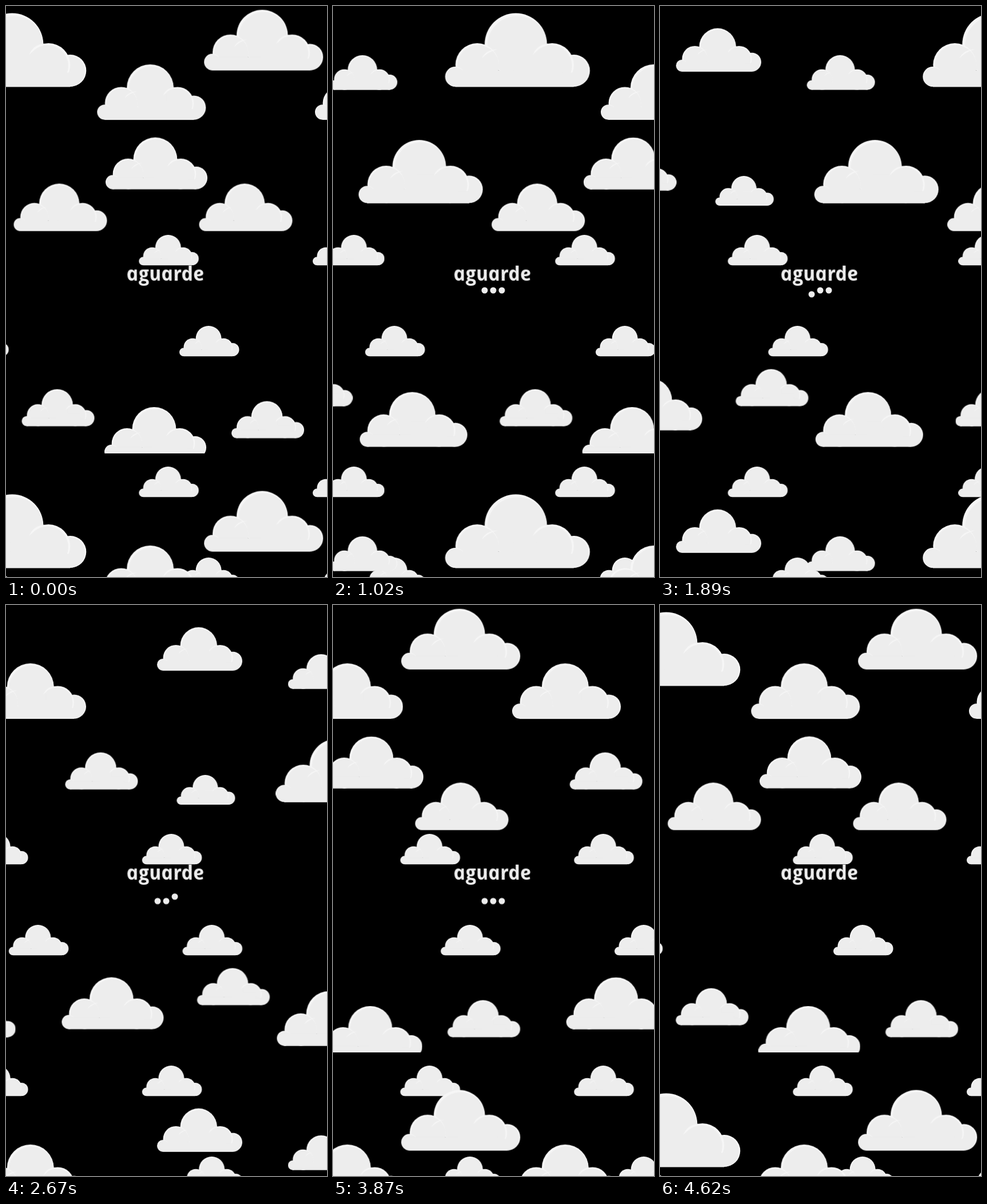
An HTML page that plays this animation: 561x998 px, repeating every 4.65 s.

```html
<!DOCTYPE html>
<html lang="pt">
<head>
<meta charset="utf-8">
<title>aguarde</title>
<style>
  html, body { margin: 0; width: 100%; height: 100%; overflow: hidden; background: #000; }
  svg { display: block; width: 561px; height: 998px; }
  .soft { fill: #ededed; }
  .light { fill: #f6f6f6; }
  .layer { animation: drift 4650ms steps(155) infinite; }
  .dot { animation: dot 4650ms linear infinite backwards; }
  /* an italic set upright again keeps its single-storey letters */
  text { font: italic 700 35px "Open Sans", "Noto Sans", sans-serif; text-anchor: middle; }
  @keyframes drift {
    from { transform: translateX(0); }
    to { transform: translateX(var(--travel)); }
  }
  @keyframes dot {
    0% { opacity: 0; transform: translateY(0); }
    6.45% { opacity: 1; }
    33.94% { transform: translateY(0); animation-timing-function: ease-in-out; }
    50.7% { transform: translateY(20.5px); }
    83.55% { opacity: 1; }
    85.3%, 100% { opacity: 0; transform: translateY(20.5px); }
  }
</style>
</head>
<body>
<svg viewBox="0 0 561 998">
  <defs>
    <g id="cloud"></g>
    <clipPath id="band"><path d="M-3000 600H3000V781.5H-3000Z"/></clipPath>
  </defs>
  <g id="sky"></g>
  <g id="label" class="soft">
    <text transform="translate(280.5 480) skewX(12)">aguarde</text>
  </g>
</svg>
<script>
  const WIDTH = 253;
  const FRAMES = 155;
  const cloud = document.getElementById('cloud');
  const sky = document.getElementById('sky');
  const label = document.getElementById('label');

  function add(parent, tag, attrs) {
    const node = document.createElementNS('http://www.w3.org/2000/svg', tag);
    for (const name in attrs) node.setAttribute(name, attrs[name]);
    parent.append(node);
    return node;
  }

  // The cloud stands on y = 0; each lobe is lit along its outer upper edge.
  function lobe(cx, cy, r, side) {
    const inset = 0.045 * r;
    add(cloud, 'circle', { class: 'light', cx, cy, r });
    add(cloud, 'circle', { class: 'soft', cx: cx + side * inset, cy: cy + inset, r: r - inset });
  }
  lobe(123.5, -74.5, 54.5, 1);
  lobe(225, -28.5, 28, -1);
  lobe(187, -38.5, 38, -1);
  lobe(56, -38.5, 38, 1);
  lobe(17.5, -18, 17.5, 1);
  add(cloud, 'path', { class: 'soft', d: 'M17.5 0V-29H120V-60H160V-45H205V-25H225V0Z' });
  add(cloud, 'path', {
    class: 'light',
    d: 'M64-50Q70-65 92-66Q76-62 64-50ZM153-56Q160-74 180-76Q165-69 153-56Z'
  });

  // One drifting layer repeats sideways every `period`, and again `drop` lower.
  function addLayer(period, clouds, { drop = 0, clip } = {}) {
    const layer = add(sky, 'g', { class: 'layer' });
    layer.style.setProperty('--travel', period * FRAMES / (FRAMES - 1) + 'px');
    if (clip) layer.setAttribute('clip-path', `url(#${clip})`);
    for (const dy of new Set([0, drop]))
      for (const [x, base, width] of clouds)
        for (const turn of [-1, 0, 1])
          add(layer, 'use', {
            href: '#cloud',
            transform: `translate(${x + turn * period} ${base + dy}) scale(${width / WIDTH})`
          });
  }

  const far = [0, 1, 2, 3].map(i => {
    const row = i >> 1;
    return [232.3 + 70.7 * row - 402.8 * (i % 2), 453.3 + 159 * row, 104.5];
  });
  const upper = [
    [-587, 322.4, 127], [-392, 349, 102], [-219, 344.8, 217],
    [13.5, 393.5, 163], [174, 320.4, 178], [337.5, 393.5, 163]
  ];
  const lower = [
    [-593, 741.4, 178], [-356.5, 699.4, 127], [-217, 770.6, 188],
    [27.5, 734.5, 127], [172, 791.6, 178], [394, 755.4, 127]
  ];
  const near = [
    [-544, 114.8, 149], [-315.3, 146.5, 119], [-112.7, 141.5, 253],
    [346.2, 112.7, 208], [159.3, 199, 190], [540, 199, 190]
  ];

  addLayer(706.5, far, { drop: 405 });
  addLayer(1194.6, upper);
  addLayer(1194.6, lower, { clip: 'band' });
  addLayer(1398, near, { drop: 841 });

  for (let i = 0; i < 3; i++)
    add(label, 'circle', {
      class: 'dot', cx: 265 + 15 * i, cy: 497, r: 5.5, style: `animation-delay:${325 * i}ms`
    });
</script>
</body>
</html>
```
